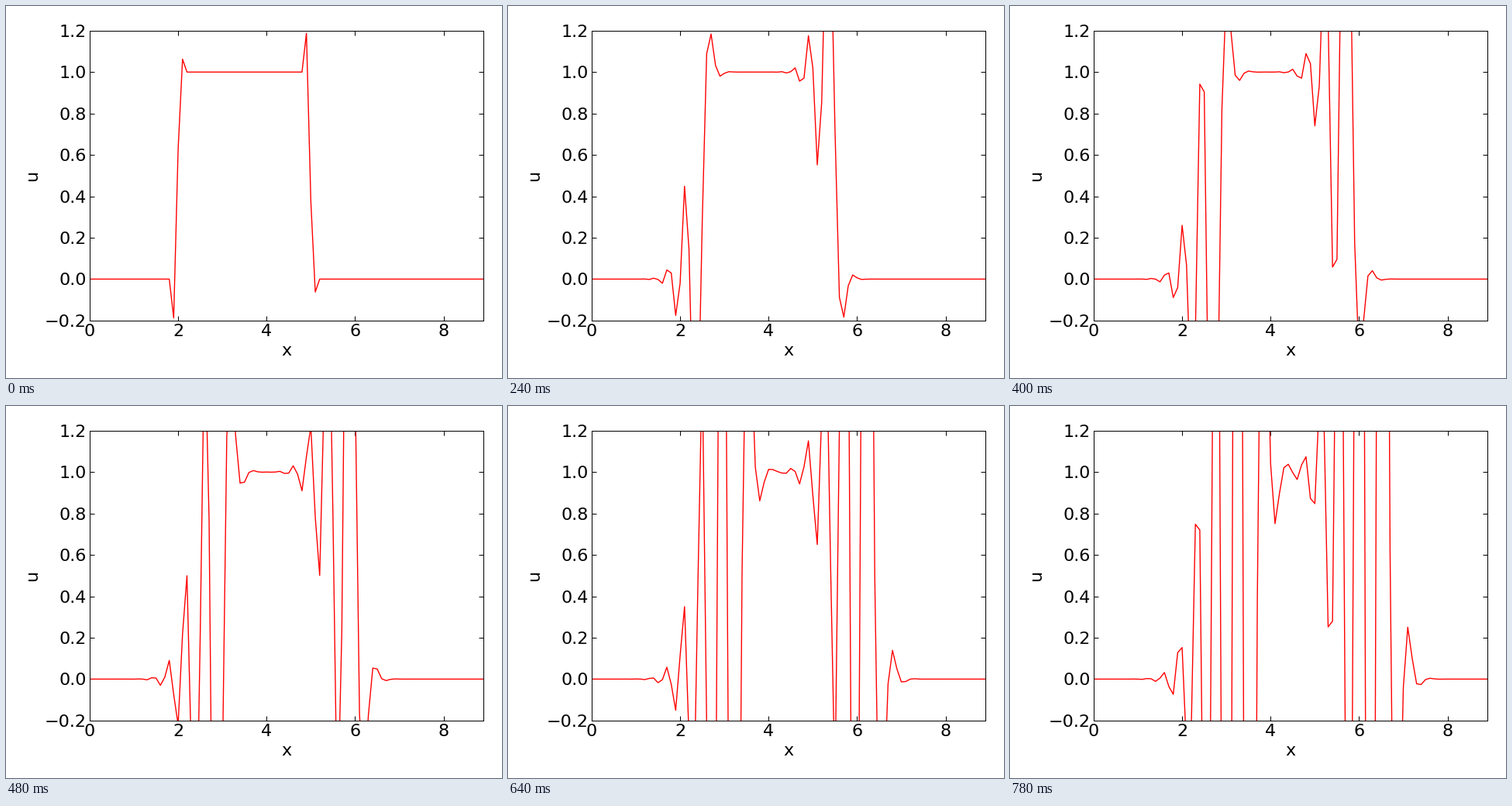
A matplotlib script that plays this animation: 640 px wide and 480 px high, repeating every 800 ms.

```python
import numpy as np
import matplotlib.pyplot as plt
from matplotlib.animation import FuncAnimation

W, H, DPI = 640, 480, 100
PIXEL = 72 / DPI
FRAMES, INTERVAL = 40, 20
COURANT = 0.5
FONT = dict(family="DejaVu Sans", size=16)


def advect(u):
    """One forward Euler step of QUICK advection to the right."""
    new = u.copy()
    slope = 3 * u[3:] + 3 * u[2:-1] - 7 * u[1:-2] + u[:-3]
    new[2:-1] -= COURANT * slope / 8
    return new


def solve(steps):
    index = np.arange(90)
    u = np.where((index >= 20) & (index < 50), 1.0, 0.0)
    states = []
    for _ in range(steps):
        u = advect(u)
        states.append(u)
    return index * 0.1, states


x, states = solve(FRAMES)

fig = plt.figure(figsize=(W / DPI, H / DPI), dpi=DPI, facecolor="white")
left, right, top, bottom = 107.9, 616, 31.8, 405.8
ax = fig.add_axes([left / W, 1 - bottom / H,
                   (right - left) / W, (bottom - top) / H])
ax.set_xlim(0, 8.9)
ax.set_ylim(-0.2, 1.2)
ax.set_xticks(range(0, 9, 2))
levels = np.arange(-1, 7) / 5
ax.set_yticks(levels, [f"{v:.1f}".replace("-", "\u2212") for v in levels])
ax.tick_params(direction="in", top=True, right=True, length=4, width=PIXEL)
ax.tick_params(axis="x", pad=2.9)
ax.tick_params(axis="y", pad=2.75)
for label in ax.get_xticklabels() + ax.get_yticklabels():
    label.set(**FONT)
for spine in ax.spines.values():
    spine.set_linewidth(PIXEL)

# Axis names sit on fixed baselines
fig.text(361.5 / W, 1 - 451 / H, "x", ha="center", va="baseline", **FONT)
fig.text(40 / W, 1 - 218.5 / H, "u", ha="center", va="baseline",
         rotation=90, rotation_mode="anchor", **FONT)

line, = ax.plot(x, states[0], color="red", lw=1)


def update(frame):
    line.set_ydata(states[frame])
    return line,


anim = FuncAnimation(fig, update, frames=FRAMES, interval=INTERVAL,
                     repeat=True, repeat_delay=0, blit=False)
plt.show()
```
